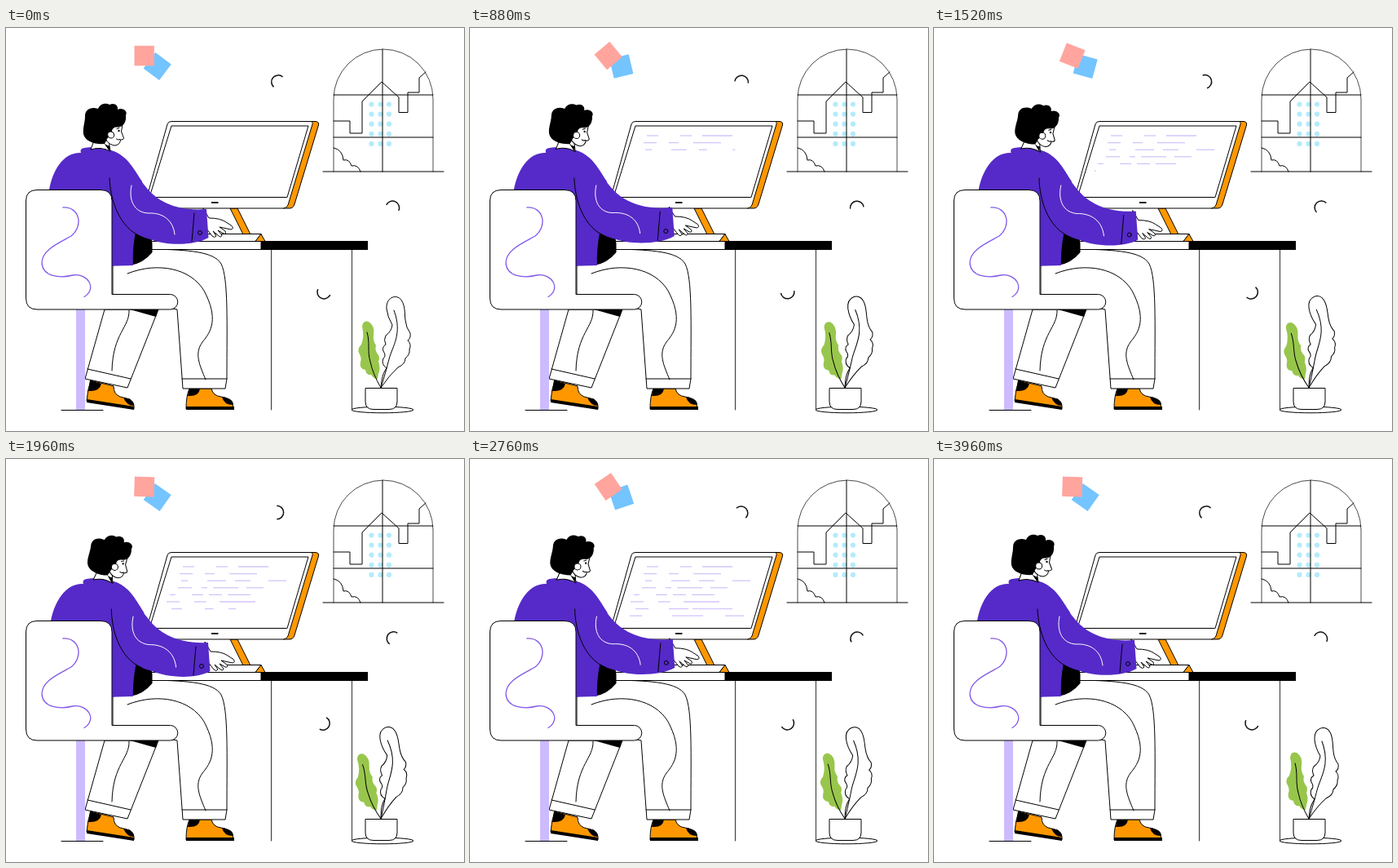
An HTML page that plays this animation: 562x494 px, repeating every 4000 ms.

```html
<!DOCTYPE html>
<html lang="en">
<head>
<meta charset="utf-8">
<title>Working at a desk</title>
<style>
html, body { margin: 0; width: 100%; height: 100%; overflow: hidden; background: #fff; }
svg { display: block; width: 562px; height: 494px; }
.l { fill: none; stroke: #000; stroke-width: 1; stroke-linecap: round; stroke-linejoin: round; }
.w { fill: #fff; stroke: #000; stroke-width: 1; stroke-linejoin: round; }
.o { fill: #ff9800; stroke: #000; stroke-width: 1; stroke-linejoin: round; }
.p { fill: #552ac8; }
.arc { fill: none; stroke: #111; stroke-width: 1.5; }
</style>
</head>
<body>
<svg viewBox="0 0 562 494">
  <rect id="blue" x="-12.2" y="-12.2" width="24.4" height="24.4" fill="#74c4ff"/>
  <rect id="pink" x="-12.2" y="-12.2" width="24.4" height="24.4" fill="#ffa59e"/>
  <g id="arcs"></g>

  <!-- window -->
  <g id="dots" fill="#b4ebfb"></g>
  <path class="l" stroke-opacity=".7" d="M402 176V87a61 61 0 0 1 122 0V176"/>
  <path class="l" d="M389 176H537M462 26V176M402 82H524M402 134H524"/>
  <path class="l" d="M402 114H422V129H437V90L461 66L482 85V103.500H493V79H507V61L515 54"/>
  <path class="l" d="M402 147Q413 149 414 162Q421 160 424 169Q432 167 435 176"/>

  <!-- monitor -->
  <path class="o" d="M275 221H284L300 253H291Z"/>
  <path class="o" d="M372 114.500H379Q384.500 114.500 383.500 119L354 216Q352.500 221 348 221H340Z"/>
  <path class="w" d="M203 114.500H373Q377 114.500 376 118L346 217Q344.500 221 340 221H176Q169 221 171 214L198 118Q199 114.500 203 114.500Z"/>
  <path class="w" d="M203 120H371L345 207.500H176Z"/>
  <path d="M252 214H260.500" stroke="#000" stroke-width="1.8"/>
  <g id="code" stroke="#d3c5fb" stroke-width="1.3"></g>

  <!-- legs and shoes -->
  <path class="o" d="M104 432L132 439Q132 449 140 452L152 455Q158 459 157 467L99 457Q100 443 104 432Z"/>
  <path d="M103 432L117 436Q115 446 101 445ZM144 453Q157 455 157 463Q148 463 144 453ZM99 455L157 464V468L99 459Z"/>
  <path class="w" d="M121 345L97 430L149 441L187 345Z"/>
  <path class="l" d="M100 418L153 430M151 346C152 367 131 374 130 420"/>
  <path d="M152 345H187L184 354Z"/>
  <path class="o" d="M225 442H252Q254 451 264 452Q279 454 279 467H221Q221 451 225 442Z"/>
  <path d="M225 442H238Q237 452 223 451ZM265 452Q279 454 279 462Q267 462 265 452ZM221 464H280V468H221Z"/>
  <path class="w" d="M131 292C145 276 165 271 180 271C224 272 255 274 264 289C273 307 271 360 271 430L269 442H217L210 345L131 330Z"/>
  <path class="l" d="M216 430H271M149 301C187 286 227 295 243 322C261 356 252 372 241 385C231 399 237 412 245 431"/>

  <!-- desk -->
  <path class="l" stroke-opacity=".8" d="M325.500 272V468M424.500 272V468"/>
  <path class="w" d="M165 261.500H313V271.500H165Z"/>
  <path d="M313 261H444V272H313Z"/>
  <path class="w" d="M236 252.500H313L306 261.500H230Z"/>
  <path class="o" d="M306 261.500L313 252.500L318 261.500Z"/>

  <!-- person -->
  <path d="M150 225Q179 247 179.500 264V275Q168 289 152 291Z"/>
  <path id="torso" class="p"/>
  <g id="hand">
    <path class="w" d="M242 221L249 233Q263 233 270 238L277 242.500Q280 246 276 247L262 244L269 249Q271 253 267 252L260 248L265 254Q264 258 260 254L254 249L258 255Q256 258 253 255L246 246Z"/>
  </g>
  <path id="sleeve" class="p"/>
  <path id="seam" class="l"/>
  <path id="fold" class="l" style="stroke:#fff"/>
  <g id="cuff">
    <path class="l" d="M231 227L228 262"/>
    <circle class="l" cx="238" cy="251" r="2.500"/>
  </g>
  <g id="head">
    <path class="w" d="M108 138L104 149Q116 145 128 151L126 138Z"/>
    <path d="M120 141Q124 145 127 144V151Z"/>
    <path class="w" d="M122 118H143L141.500 127L144.500 135Q144 137.500 140.500 137Q140 143 134 144Q127 144 122 136Z"/>
    <path d="M121 142C109 143 97 139 95 130C94 122 97 116 97 108C97 100 104 96 113 99C116 92 123 92 127 94C133 91 138 95 137 100C143 97 150 102 147 107C148 115 144 121 138 121.500C133 121 130 123 130 127L124 136Z"/>
    <circle class="w" cx="128.700" cy="131" r="4"/>
    <path class="l" d="M135.500 136Q137.500 138 140 136.500M136 123.500L139 122.500"/>
    <circle cx="138.500" cy="126" r="1.200"/>
  </g>

  <!-- chair -->
  <rect x="86" y="345" width="11" height="123" fill="#cdbbff"/>
  <path class="l" d="M68 468.500H119"/>
  <path class="w" d="M38 198.500H116Q130 198.500 130 212V326.500H201.500a9 9 0 0 1 0 18.500H38Q24.500 345 24.500 331V212Q24.500 198.500 38 198.500Z"/>
  <path class="l" style="stroke:#8259e8;stroke-width:1.300" d="M70 220C91 219 95 243 80 255C64 264 44 272 44 288C45 305 66 307 82 303C101 300 112 320 96 329.500"/>

  <!-- plant -->
  <ellipse class="w" cx="462" cy="468" rx="38" ry="3.800"/>
  <g id="plant">
    <path fill="#98c64c" d="M437 366Q438 358 445 360Q453 365 451 377Q450 383 454 389Q452 395 457 401Q459 404 457 409Q460 417 457 424L456 430Q451 430 448 425Q442 426 441 419Q433 418 435 409Q437 405 433 398Q431 393 436 388Q440 378 437 366Z"/>
    <path class="l" d="M443 373C447 386 443 396 447 409Q450 424 460 441"/>
    <path class="w" d="M460 441C461 430 462 424 467 417Q460 412 463 405Q467 402 463 396Q461 391 466 388Q463 382 466 377Q473 372 474 364Q468 354 467 344C466 329 481 325 486 335C490 342 489 350 490 358Q491 368 496 374Q497 380 493 383Q498 388 495 394Q496 400 490 405Q490 412 481 416Q470 426 460 441Z"/>
    <path class="l" d="M476 346C487 375 474 390 470 406Q466 422 460 441"/>
  </g>
  <path class="w" d="M441 441.500H480V458Q480 467.500 470 467.500H451Q441 467.500 441 458Z"/>
</svg>
<script>
const LOOP = 4000;
const $ = id => document.getElementById(id);
const set = (el, name, value) => el.setAttribute(name, value);
const clamp = v => Math.max(0, Math.min(1, v));

function add(parent, tag, attrs) {
  const el = document.createElementNS(parent.namespaceURI, tag);
  for (const k in attrs) set(el, k, attrs[k]);
  return parent.appendChild(el);
}

for (const x of [448.5, 459.5, 470])
  for (let i = 0; i < 5; i++) add($('dots'), 'circle', { cx: x, cy: 93.5 + i * 12.1, r: 3.1 });

// Arcs: pivot, middle angle at rest, swing
const arcs = [[333.3, 65.5, -138, 138], [474.7, 219.5, -65, -80], [389.8, 324.5, 115, -85]].map(([x, y, rest, swing]) => ({
  x, y, rest, swing, el: add($('arcs'), 'path', { class: 'arc', d: 'M-1 -8.300A8.300 8.300 0 0 1 -1 8.300' })
}));

// Start and end of every dash, row by row
const rows = [
  [217, 231, 258, 272, 285, 322],
  [213, 229, 244, 256, 274, 308],
  [215, 223, 247, 270, 281, 300, 322, 344],
  [211, 228, 240, 247, 254, 285, 295, 316],
  [201, 208, 228, 242, 249, 265, 272, 300],
  [197, 213, 231, 246, 262, 306],
  [203, 219, 244, 268, 273, 322],
  [196, 211, 248, 286, 313, 336]
];
const dashes = [];
rows.forEach((row, i) => {
  const y = 132 + i * 8.6;
  for (let k = 0; k < row.length; k += 2) {
    const x = row[k];
    dashes.push({
      x, len: row[k + 1] - x, start: 50 + 290 * i + 220 * (x - 197) / 125,
      el: add($('code'), 'line', { x1: x, y1: y, x2: x, y2: y })
    });
  }
});

function place(id, x, y, angle) {
  set($(id), 'transform', `translate(${x} ${y}) rotate(${angle})`);
}

function draw(t) {
  const turn = t / LOOP;
  const lean = (1 - Math.cos(2 * Math.PI * turn)) / 2;
  const lift = Math.pow((1 + Math.cos(4 * Math.PI * turn - 2.58)) / 2, 3);
  const hx = 2 * lean + 1.5 * lift;
  const hy = 3 * lean - 3.3 * lift;

  place('pink', 169.7, 34, -180 * turn);
  place('blue', 185.7, 47, 37 + 180 * turn);
  for (const a of arcs) set(a.el, 'transform', `translate(${a.x} ${a.y}) rotate(${a.rest + a.swing * lean})`);

  for (const d of dashes) {
    const p = clamp((t - d.start) / 200);
    set(d.el, 'x2', d.x + d.len * p);
    set(d.el, 'visibility', p > 0 ? 'visible' : 'hidden');
  }
  set($('code'), 'opacity', 1 - clamp((t - 2950) / 250));

  // Blends the leaning body with the moving hand; w is the hand's share
  const q = (x, y, w = 0) => {
    const dx = 3 * lean * (291 - y) / 140;
    return `${(x + dx * (1 - w) + hx * w).toFixed(2)} ${(y + hy * w).toFixed(2)} `;
  };
  set($('torso'), 'd', `M${q(52, 205)}C${q(56, 172)}${q(72, 152)}${q(92, 153)}` +
    `Q${q(90, 148)}${q(96, 147)}Q${q(115, 144)}${q(132, 151)}C${q(150, 158)}${q(158, 175)}${q(167, 188)}` +
    `L${q(162, 238)}C${q(157, 255)}${q(155, 275)}${q(156, 291)}L120 292L60 240Z`);
  set($('sleeve'), 'd', `M${q(127, 172)}L${q(132, 151)}C${q(153, 160)}${q(158, 178)}${q(171, 194)}` +
    `C${q(185, 212, .3)}${q(208, 225, .7)}${q(246, 222, 1)}L${q(248.5, 257, 1)}` +
    `C${q(232, 267, 1)}${q(196, 267, .5)}${q(177, 259, .2)}C${q(140, 250)}${q(128, 215)}${q(127, 185)}Z`);
  set($('seam'), 'd', `M${q(127, 184)}C${q(128, 210)}${q(138, 244)}${q(166, 256, .1)}`);
  set($('fold'), 'd', `M${q(154, 193)}C${q(150, 212)}${q(158, 226)}${q(174, 227, .2)}` +
    `C${q(192, 226, .4)}${q(205, 235, .6)}${q(207, 253, .7)}`);

  const move = `translate(${hx} ${hy})`;
  set($('hand'), 'transform', move);
  set($('cuff'), 'transform', move);
  set($('head'), 'transform', `translate(${3 * lean} 0) rotate(${5.5 * lean} 115 150)`);
  set($('plant'), 'transform', `rotate(${-4.7 * lean} 460 441)`);
}

const begin = performance.now();
function tick() {
  draw((performance.now() - begin) % LOOP);
  requestAnimationFrame(tick);
}
tick();
</script>
</body>
</html>
```
